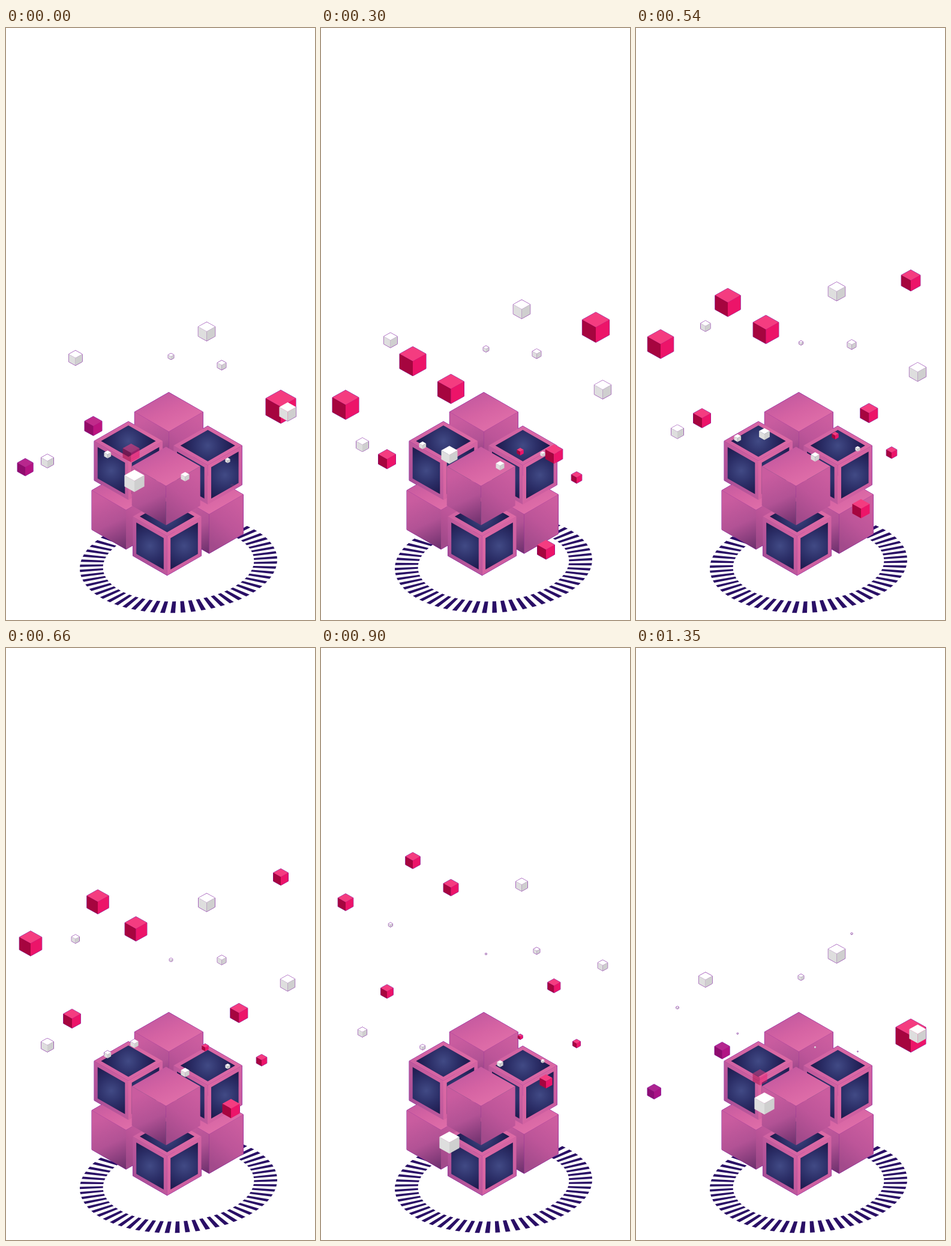
These frames come from a looping animation (515 px wide and 985 px high, 1380 ms). An HTML page with a canvas:

```html
<!DOCTYPE html>
<html lang="en">
<head>
<meta charset="utf-8">
<title>Cubes</title>
<style>
  html, body { margin: 0; width: 100%; height: 100%; overflow: hidden; background: #fff; }
  canvas { display: block; }
</style>
</head>
<body>
<canvas id="stage" width="515" height="985"></canvas>
<script>
const LOOP = 1380, STEP = 30;
const MATTE = '#7a129c', INK = '#2a0f66';
const RED = ['#f43c80', '#a6053f', '#ec1469'];
const WHITE = ['#ffffff', '#dedede', '#cfcfcf'];
const ctx = document.getElementById('stage').getContext('2d');

// x, centre y at birth, half width, birth time
const reds = [
  [458, 840, 25, -518], [153, 743, 22, -227], [41, 806, 22, -205],
  [216.5, 786, 22, -220], [110, 801.3, 14.5, -85], [375, 949, 14.5, -75],
  [388.3, 790, 14.5, -75], [426, 795.4, 8.8, -65], [332, 735.7, 5.7, -65]
];
// x, centre y at time zero, half width, birth time
const whites = [
  [334.5, 505, 14.2, -57], [115.8, 549, 11.3, -390], [275, 546.5, 4.8, -395],
  [359.5, 561, 7.3, -23], [469.5, 638.5, 14.1, -150], [69, 720.5, 10.4, -25],
  [169.3, 709.5, 5.8, -20], [214, 753.5, 16.6, -550], [298.5, 746.5, 7, -20],
  [369.5, 719.5, 4.1, -20]
];

function poly(c, pts) {
  c.beginPath();
  for (const [x, y] of pts) c.lineTo(x, y);
  c.closePath();
}

function hexagon(x, y, w, h) {
  return [[x, y - h], [x + w, y - h / 2], [x + w, y + h / 2],
          [x, y + h], [x - w, y + h / 2], [x - w, y - h / 2]];
}

// top, left and right faces
function faces(x, y, w, h) {
  const [t, ru, rl, b, ll, lu] = hexagon(x, y, w, h), m = [x, y];
  return [[t, ru, m, lu], [lu, m, b, ll], [m, ru, rl, b]];
}

function silhouette(c, x, y, w, h) {
  poly(c, hexagon(x, y, w, h));
  c.fillStyle = c.strokeStyle = MATTE;
  c.lineWidth = 1;
  c.fill();
  c.stroke();
}

function paintCube(c, x, y, w, h, fills) {
  faces(x, y, w, h).forEach((f, i) => {
    poly(c, f);
    c.fillStyle = fills[i];
    c.fill();
  });
}

function linear(c, x0, y0, x1, y1, ...colors) {
  const g = c.createLinearGradient(x0, y0, x1, y1);
  colors.forEach((col, i) => g.addColorStop(i / (colors.length - 1), col));
  return g;
}

function solid(c, x, y, w, h) {
  paintCube(c, x, y, w, h, [
    linear(c, x - w * .3, y - h, x + w * .2, y, '#c2589f', '#d563a3', '#e06fa9'),
    linear(c, x - w * .7, y - h * .3, x - w * .05, y + h * .95, '#c95c9f', '#b25295', '#71326f'),
    linear(c, x + w, y - h * .2, x + w * .1, y + h * .8, '#cb5d9f', '#bd5599', '#a24a8b')
  ]);
}

function framed(c, x, y, w, h) {
  paintCube(c, x, y, w, h, [
    linear(c, x - w, y, x + w, y, '#cf62a2', '#dd6aa5'),
    linear(c, x - w, y + h / 2, x, y, '#a84e96', '#d363a1'),
    linear(c, x, y, x + w, y + h / 2, '#dd69a4', '#c95c9f')
  ]);
  for (const f of faces(x, y, w, h)) {
    const cx = (f[0][0] + f[2][0]) / 2, cy = (f[0][1] + f[2][1]) / 2;
    const g = c.createRadialGradient(cx, cy, 0, cx, cy, w * .72);
    g.addColorStop(0, '#414a85');
    g.addColorStop(.55, '#2c2f68');
    g.addColorStop(1, '#1f1c50');
    poly(c, f.map(([px, py]) => [cx + (px - cx) * .8, cy + (py - cy) * .8]));
    c.fillStyle = g;
    c.fill();
  }
}

function buildStack() {
  const cv = document.createElement('canvas');
  cv.width = 515;
  cv.height = 985;
  const c = cv.getContext('2d');
  const stack = [
    [solid, 200, 802], [solid, 338.5, 809], [solid, 271.3, 671.5],
    [framed, 204, 720], [framed, 336.3, 727.5],
    [framed, 268.5, 845.5], [solid, 266.7, 762]
  ];
  for (const [, x, y] of stack) silhouette(c, x, y, 57, 65.3);
  for (const [draw, x, y] of stack) draw(c, x, y, 57, 65.3);
  return cv;
}
const stackImage = buildStack();

function ring(t) {
  const gap = Math.PI / 30, half = .024;
  const start = 3.3 * Math.PI / 180 - 3 * gap * t / LOOP;
  const at = (a, k) => {
    const dx = 164.5 * k * Math.cos(a);
    return [287.5 + dx, 892 + 81 * k * Math.sin(a) - .045 * dx];
  };
  ctx.fillStyle = INK;
  for (let i = 0; i < 60; i++) {
    const a = start + i * gap;
    poly(ctx, [at(a - half, 1), at(a + half, 1), at(a + half, .765), at(a - half, .765)]);
    ctx.fill();
  }
}

// distance risen, in half widths
function rise(age) {
  const legs = [[345, .0145], [728, .0196], [1200, .013], [LOOP, .0105]];
  let d = 0, from = 0;
  for (const [to, v] of legs) {
    d += Math.max(0, Math.min(age, to) - from) * v;
    from = to;
  }
  return d;
}

const localTime = (t, birth) => t < birth + LOOP ? t : t - LOOP;

function redAt(t, [x, y, w, birth]) {
  const age = localTime(t, birth) - birth, h = w * 1.11;
  const grow = Math.min(1, age / 345);
  const s = grow * Math.min(1, 1 - (age - 735) * .00113);
  const fade = Math.min(1, 1 - (age - 1200) / 300);
  // grows from its top left corner, shrinks about its centre
  return {
    x: x - w * (1 - grow), y: y - w * rise(age) - h * (1 - grow),
    w: w * s, h: h * s, alpha: Math.min(grow ** 1.3, fade), fills: RED
  };
}

function whiteAt(t, [x, y, w, birth]) {
  const lt = localTime(t, birth);
  const s = Math.min(1, 1 - (lt - birth - 690) * .00116);
  return { x, y: y - .0087 * w * lt, w: w * s, h: w * s * 1.11, alpha: 1, fills: WHITE };
}

function draw(t) {
  const cubes = [...reds.map(r => redAt(t, r)), ...whites.map(w => whiteAt(t, w))];
  ctx.clearRect(0, 0, 515, 985);
  for (const c of cubes) if (c.alpha >= .4) silhouette(ctx, c.x, c.y, c.w, c.h);
  ring(t);
  ctx.drawImage(stackImage, 0, 0);
  // faint cubes show only over what is already painted
  ctx.globalCompositeOperation = 'source-atop';
  for (const c of cubes) {
    ctx.globalAlpha = c.alpha;
    paintCube(ctx, c.x, c.y, c.w, c.h, c.fills);
  }
  ctx.globalAlpha = 1;
  ctx.globalCompositeOperation = 'source-over';
}

const begin = performance.now();
function tick() {
  const t = (performance.now() - begin) % LOOP;
  draw(Math.floor(t / STEP) * STEP);
  requestAnimationFrame(tick);
}
tick();
</script>
</body>
</html>
```
